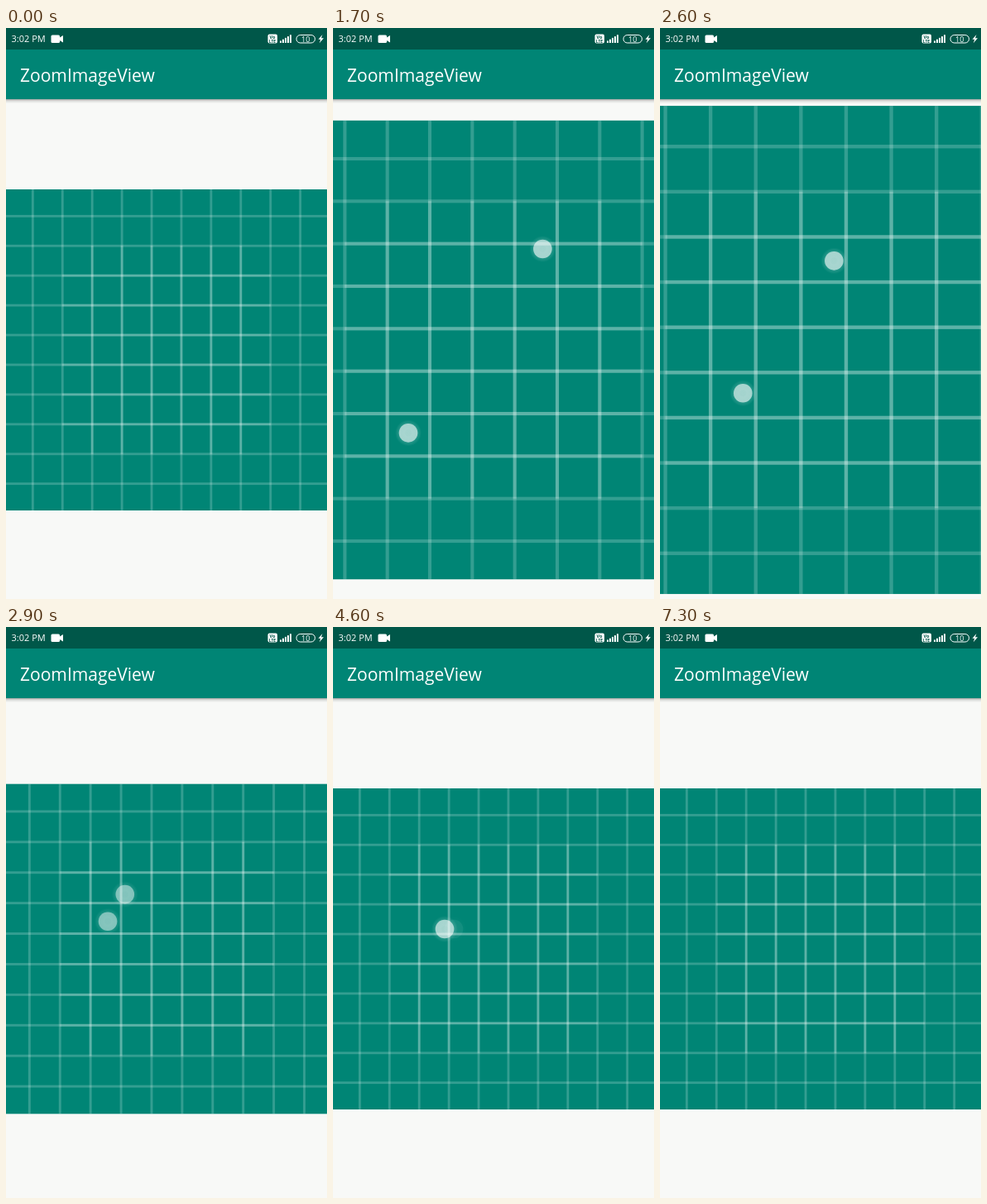
An HTML page with a canvas for the animation above (7700 ms loop, 388 by 690 pixels).

```html
<!DOCTYPE html>
<html lang="en">
<head>
<meta charset="utf-8">
<title>ZoomImageView</title>
<style>
  html, body { margin: 0; width: 100%; height: 100%; overflow: hidden; background: #f8f9f7; }
  canvas { display: block; }
</style>
</head>
<body>
<canvas id="stage" width="388" height="690"></canvas>
<script>
const W = 388, H = 690, LOOP = 7700, STEP = 100;
const TEAL = '#008575', DARK = '#005749', PAPER = '#f8f9f7';
const ctx = document.getElementById('stage').getContext('2d');

const ramp = (t, from, to) => Math.min(1, Math.max(0, (t - from) / (to - from)));
const ease = (t, from, to) => {
  const p = ramp(t, from, to);
  return p * p * (3 - 2 * p);
};
// Appears within one step, then fades out until the end
const pulse = (t, start, end) => ramp(t, start - 100, start) - ramp(t, end - 200, end);

function box(x, y, w, h, color) {
  ctx.fillStyle = color;
  ctx.fillRect(x, y, w, h);
}

function polygon(...points) {
  ctx.beginPath();
  points.forEach(([x, y]) => ctx.lineTo(x, y));
  ctx.fill();
}

function pill(x, y, w, h, r) {
  ctx.beginPath();
  ctx.roundRect(x, y, w, h, r);
}

function label(text, x, y, size, color = '#fff', weight = 500) {
  ctx.font = `${weight} ${size}px "Open Sans", "Noto Sans", sans-serif`;
  ctx.fillStyle = color;
  ctx.fillText(text, x, y);
}

// A 108-unit square with full grid lines and a brighter inner grid
function drawImage(scale, cx, cy) {
  const unit = W * scale / 108;
  ctx.save();
  ctx.translate(cx - 54 * unit, cy - 54 * unit);
  ctx.scale(unit, unit);
  box(0, 0, 108, 108, TEAL);
  const cross = (at, from, length) => {
    box(at - .4, from, .8, length, 'rgba(255,255,255,.2)');
    box(from, at - .4, length, .8, 'rgba(255,255,255,.2)');
  };
  for (let at = 9; at < 108; at += 10) cross(at, 0, 108);
  for (let at = 29; at < 89; at += 10) cross(at, 19, 70);
  ctx.restore();
}

function drawTouch(x, y, alpha) {
  if (alpha <= 0) return;
  ctx.save();
  ctx.globalAlpha = alpha;
  ctx.translate(x, y);
  const disc = (radius, inner, outer) => {
    const fill = ctx.createRadialGradient(0, 0, 0, 0, 0, radius);
    fill.addColorStop(.3, `rgba(255,255,255,${inner})`);
    fill.addColorStop(1, `rgba(255,255,255,${outer})`);
    ctx.fillStyle = fill;
    ctx.beginPath();
    ctx.arc(0, 0, radius, 0, 7);
    ctx.fill();
  };
  disc(16, .35, 0);
  disc(11.3, .45, .6);
  ctx.restore();
}

function drawBars() {
  const shade = ctx.createLinearGradient(0, 86, 0, 91);
  shade.addColorStop(0, 'rgba(0,0,0,.34)');
  shade.addColorStop(.4, 'rgba(0,0,0,.12)');
  shade.addColorStop(1, 'rgba(0,0,0,0)');
  box(0, 86, W, 5, shade);
  box(0, 26, W, 60, TEAL);
  box(0, 0, W, 26, DARK);
  label('ZoomImageView', 17, 65, 21);
  label('3:02 PM', 6.5, 17, 11);

  // Camera
  ctx.fillStyle = '#fff';
  pill(54.5, 8.5, 10.5, 9.5, 1.5);
  ctx.fill();
  polygon([64, 12], [69, 9], [69, 17.5], [64, 14.5]);

  // Network and signal
  pill(316.5, 7.5, 11.5, 11, 2);
  ctx.fill();
  label('Vo', 318.5, 12.8, 5.5, DARK, 700);
  label('LTE', 317.7, 17.6, 5, DARK, 700);
  for (let i = 0; i < 5; i++) box(331 + i * 3, 15.5 - i * 1.8, 2, 2.5 + i * 1.8, '#fff');

  // Battery and charging bolt
  ctx.strokeStyle = '#fff';
  ctx.lineWidth = 1;
  pill(351, 8.5, 22.5, 9.5, 4.7);
  ctx.stroke();
  label('10', 357, 16.5, 9);
  ctx.fillStyle = '#fff';
  polygon([382.5, 8], [377.5, 13.8], [380.3, 13.8], [378.8, 18.3], [384, 12.2], [381, 12.2]);
}

function drawScene(t) {
  const spread = ease(t, 1420, 1998), close = ease(t, 2300, 2970);
  const pinch = spread - close;
  const doubleTap = ramp(t, 4600, 4800) - ramp(t, 6150, 6450);

  box(0, 0, W, H, PAPER);
  drawImage(1 + .9 * pinch + 2 * doubleTap, W / 2 + 15 * close * pinch, 389);
  drawBars();

  // Two fingers on opposite sides of a drifting midpoint
  const reach = 120 + 37 * spread - 142 * close, angle = -.94 - .066 * close;
  for (const side of [1, -1]) {
    drawTouch(172.2 - 40 * close + side * reach * Math.cos(angle),
              378.2 - 40 * close + side * reach * Math.sin(angle),
              pulse(t, 700, 3050));
  }
  drawTouch(169, 379, pulse(t, 3500, 3900));
  drawTouch(146, 365, pulse(t, 4300, 4620));
  drawTouch(135, 365, pulse(t, 4600, 5000));
  drawTouch(230, 465, pulse(t, 5900, 6210));
  drawTouch(230, 465, pulse(t, 6200, 6500));
}

function frame(now) {
  drawScene(Math.floor(now % LOOP / STEP) * STEP);
  requestAnimationFrame(frame);
}
requestAnimationFrame(frame);
</script>
</body>
</html>
```
